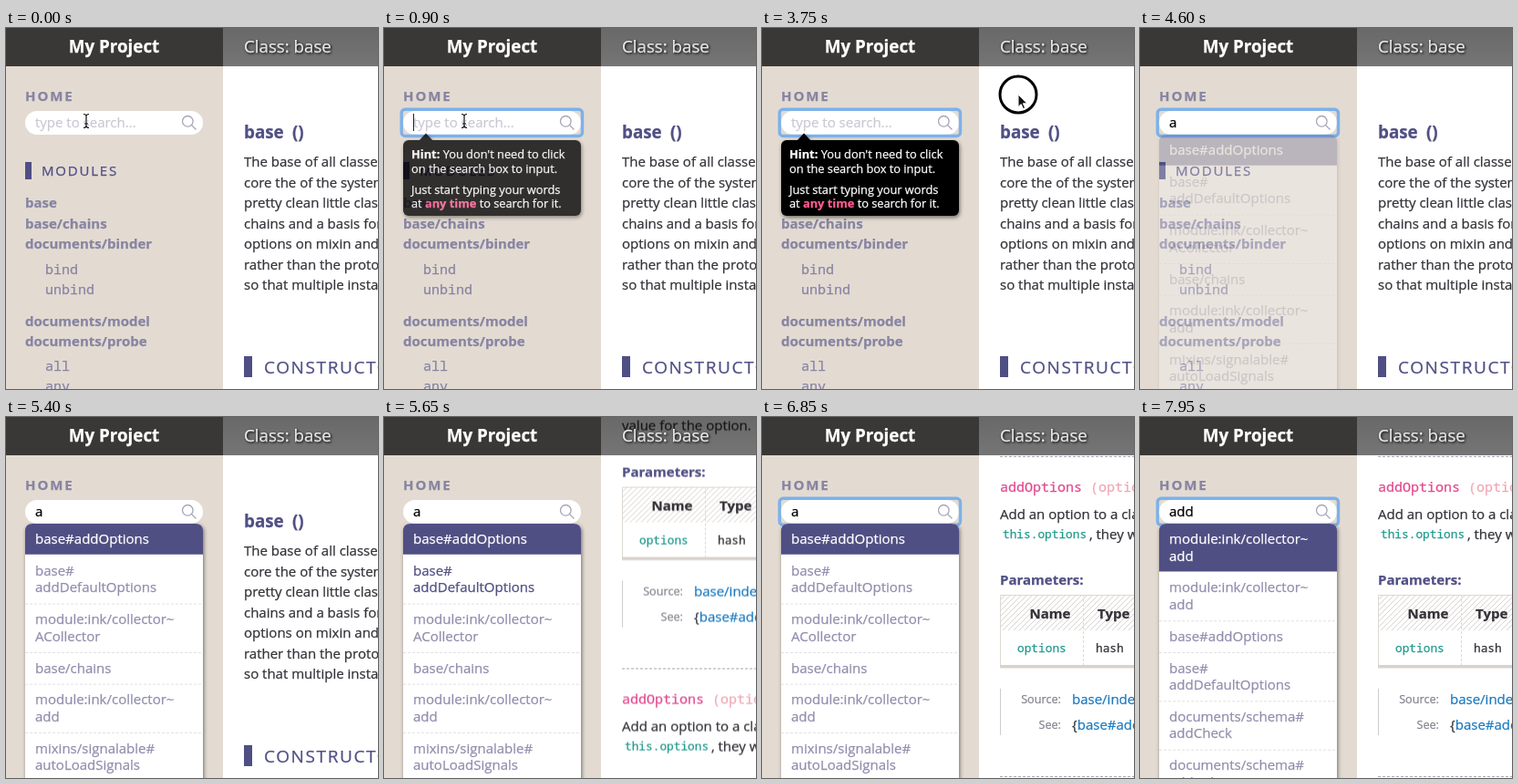
Recreate the animation shown at these times as an HTML page. Size 408x396 px, loop 8 s.

```html
<!DOCTYPE html>
<html lang="en">
<head>
<meta charset="utf-8">
<title>My Project</title>
<style>
html, body { margin: 0; width: 100%; height: 100%; overflow: hidden; background: #fff; }
svg { display: block; width: 408px; height: 396px; font: 15px "Open Sans", sans-serif; }
/* the hairline stroke gives the text a slightly fuller weight */
text { white-space: pre; fill: currentColor; stroke: currentColor; stroke-width: .25; }
tspan { fill: currentColor; }
rect.ink, path.ink { fill: currentColor; }
.b { font-weight: 700; }
.m { font-family: "Noto Sans Mono", monospace; }
.ink { color: #504f84; }
.nav { color: #8784a2; }
.body { color: #333238; }
.teal { color: #1f9a8c; font-size: 12.8px; }
.link { color: #1b7ac0; }
.note { color: #86848f; font-size: 12.7px; }
.pink { color: #e2498f; }
.pale { color: #f0a9b4; }
.hot { color: #ff5b94; }
.hush { color: #cac8d4; }
.on { color: #fff; }
.row { color: #908eae; }
.dash { stroke: #a9a5b3; stroke-dasharray: 3 2; }

/* one 8 s clock; 1% = 80 ms */
.anim { animation: 8s step-end infinite; }
.fade { animation-timing-function: linear; }
#page { animation-name: scroll; }
#ring { animation-name: ring; }
#hint { animation-name: hint; }
#caret { animation-name: caret; }
#blank { animation-name: blank; }
#a { animation-name: a; }
#ad { animation-name: ad; }
#add { animation-name: add; }
#first { animation-name: first; }
#second { animation-name: second; }
#first .warm { animation: warm 8s step-end infinite; }
#mouse { animation-name: move; }
#pointer { animation-name: pointer; }
#beam { animation-name: beam; }
#arrow { animation-name: arrow; }
#click { animation-name: click; }
.list, #hint { filter: drop-shadow(1px 2px 2px rgba(0,0,0,.5)); }

@keyframes scroll {
  0%, 67.8% { transform: translateY(0); animation-timing-function: cubic-bezier(.25,.84,.44,1); }
  75.25%, 100% { transform: translateY(-1238px); }
}
@keyframes ring {
  0%, 47.4%, 66.8% { opacity: 0; }
  6.8%, 56.2%, 81.2%, 100% { opacity: 1; }
}
@keyframes hint {
  0%, 6.8% { opacity: 0; }
  12.5%, 47.1% { opacity: 1; }
  49.4%, 100% { opacity: 0; }
}
@keyframes caret {
  0%, 14.3%, 28.1%, 43.1%, 100% { opacity: 0; }
  7.4%, 21.2%, 35% { opacity: 1; }
}
@keyframes blank { 0% { opacity: 1; } 56.2%, 100% { opacity: 0; } }
@keyframes a { 0%, 88.7%, 100% { opacity: 0; } 56.2% { opacity: 1; } }
@keyframes ad { 0%, 93.1%, 100% { opacity: 0; } 88.7% { opacity: 1; } }
@keyframes add { 0% { opacity: 0; } 93.1%, 100% { opacity: 1; } }
@keyframes first {
  0%, 56.8% { opacity: 0; }
  59.4%, 71.8% { opacity: 1; }
  74.4%, 81.2% { opacity: 0; }
  83.1%, 88.7% { opacity: 1; }
  88.71%, 100% { opacity: 0; }
}
@keyframes second { 0% { opacity: 0; } 88.7%, 100% { opacity: 1; } }
@keyframes warm { 0%, 75%, 100% { color: #908eae; } 68.7% { color: #504f84; } }
@keyframes move {
  0%, 33% { transform: translate(88px,102px); animation-timing-function: ease-in-out; }
  40%, 100% { transform: translate(281px,73px); }
}
@keyframes pointer { 0% { opacity: 1; } 56.2%, 100% { opacity: 0; } }
@keyframes beam { 0% { opacity: 1; } 36%, 100% { opacity: 0; } }
@keyframes arrow { 0% { opacity: 0; } 36%, 100% { opacity: 1; } }
@keyframes click { 0%, 48.6%, 100% { opacity: 0; } 46.8% { opacity: 1; } }
</style>
</head>
<body>
<svg viewBox="0 0 408 396" xmlns="http://www.w3.org/2000/svg">
  <defs>
    <pattern id="hatch" width="6" height="6" patternUnits="userSpaceOnUse">
      <path d="M-1 1L1-1M0 6L6 0M5 7L7 5" stroke="#d9d3ce"/>
    </pattern>
    <linearGradient id="bar" x2="0" y2="1">
      <stop offset="0" stop-color="#000" stop-opacity=".59"/>
      <stop offset="1" stop-color="#000" stop-opacity=".54"/>
    </linearGradient>
    <path id="ibeam" d="M-3-7.500Q0-7.500 0-5V5Q0 7.500-3 7.500M3-7.500Q0-7.500 0-5M0 5Q0 7.500 3 7.500M-2 3H2"/>
    <g id="spec">
      <text class="b ink" x="261" y="184">Parameters:</text>
      <rect x="261" y="195" width="160" height="39" fill="url(#hatch)"/>
      <path d="M261.500 272V195.500H420" fill="none" stroke="#dcd7d2"/>
      <path d="M352.500 195V272" stroke="#ddd8d4" stroke-dasharray="3 2"/>
      <rect x="261" y="272" width="160" height="3.500" fill="#d8d2cb"/>
      <g class="b body"><text x="293.500" y="221">Name</text><text x="368" y="221">Type</text></g>
      <text class="m teal" x="280" y="258">options</text>
      <text class="m body" x="366" y="258" font-size="12.8">hash</text>
      <path d="M261.500 298V349" stroke="#cfcbc8"/>
      <g class="note" text-anchor="end"><text x="328" y="314">Source:</text><text x="328" y="342">See:</text></g>
      <text class="link" x="340" y="315">base/index.js</text>
      <text class="body" x="340" y="343">{<tspan class="link">base#addOptions</tspan>}</text>
    </g>
  </defs>

  <g id="page" class="anim">
    <g class="b ink" font-size="18.800"><text x="261" y="121">base</text><text x="314" y="121">()</text></g>
    <g id="about" class="body"></g>
    <rect class="ink" x="261" y="360" width="9" height="23"/>
    <text class="ink" x="283" y="379" font-size="19" letter-spacing="1.6">CONSTRUCTOR</text>
    <text class="m pink" x="261" y="430">new base <tspan class="pale">(options)</tspan></text>
    <use href="#spec" y="300"/>
    <rect class="ink" x="261" y="850" width="9" height="23"/>
    <text class="ink" x="283" y="869" font-size="19" letter-spacing="1.6">METHODS</text>
    <g transform="translate(0 887)">
      <path class="dash" d="M261 43.500H408"/>
      <text class="m pink" x="261" y="82">addDefaultOptions</text>
      <text class="body" x="261" y="112">Add an option and a default</text>
      <text class="body" x="261" y="133">value for the option.</text>
      <use href="#spec"/>
    </g>
    <g transform="translate(0 1238)">
      <path class="dash" d="M261 43.500H408M261 394.500H408"/>
      <text class="m pink" x="261" y="82">addOptions <tspan class="pale">(options)</tspan></text>
      <text class="body" x="261" y="112">Add an option to a class</text>
      <text class="m teal" x="264" y="133">this.options</text>
      <text class="body" x="359" y="134">, they will</text>
      <use href="#spec"/>
    </g>
  </g>

  <rect x="238" width="170" height="42" fill="url(#bar)"/>
  <text class="on" x="261" y="27" font-size="18.700" style="text-shadow:1px 1px 3px #000">Class: base</text>

  <rect width="238" height="396" fill="#e3dbd2"/>
  <rect width="238" height="42" fill="#3a3836"/>
  <text class="b on" x="118.500" y="27" font-size="18.800" text-anchor="middle">My Project</text>
  <text class="b nav" x="21" y="80" letter-spacing="1.9">HOME</text>
  <rect class="ink" x="21" y="147" width="7" height="19"/>
  <text class="ink" x="39" y="162" letter-spacing="1.8">MODULES</text>
  <g class="b nav">
    <text x="21" y="197">base</text>
    <text x="21" y="220">base/chains</text>
    <text x="21" y="242">documents/binder</text>
    <text x="21" y="327">documents/model</text>
    <text x="21" y="349">documents/probe</text>
  </g>
  <g class="m nav">
    <text x="43" y="270">bind</text>
    <text x="43" y="292">unbind</text>
    <text x="43" y="376">all</text>
    <text x="43" y="398">any</text>
  </g>

  <rect x="21" y="91" width="195" height="26" rx="13" fill="#fff"/>
  <rect id="ring" class="anim" x="19.200" y="89.200" width="198.300" height="29.300" rx="4" fill="none" stroke="#7db1ea" stroke-width="3.400"/>
  <text id="blank" class="anim hush" x="32" y="109">type to search...</text>
  <text id="a" class="anim" x="32" y="109">a</text>
  <text id="ad" class="anim" x="32" y="109">ad</text>
  <text id="add" class="anim" x="32" y="109">add</text>
  <path id="caret" class="anim" d="M32.500 94V113" stroke="#222"/>
  <g fill="none" stroke="#a8a5b8" stroke-width="1.300"><circle cx="199.300" cy="102.300" r="5.800"/><path d="M203.500 106.500L208.500 111.500"/></g>

  <g id="hint" class="anim fade on" font-size="12.800">
    <path d="M38 124L46 115.500L54 124Z" fill="#000"/>
    <rect x="21" y="123" width="195" height="83" rx="6" fill="#000"/>
    <text x="30" y="143"><tspan class="b">Hint:</tspan> You don't need to click</text>
    <text x="30" y="158.500">on the search box to input.</text>
    <text x="30" y="181.500">Just start typing your words</text>
    <text x="30" y="196.500">at <tspan class="b hot">any time</tspan> to search for it.</text>
  </g>

  <g id="first" class="anim fade list"></g>
  <g id="second" class="anim list"></g>

  <g id="pointer" class="anim">
    <circle id="click" class="anim" cx="281" cy="73" r="20" fill="none" stroke="#000" stroke-width="3"/>
    <g id="mouse" class="anim">
      <g id="beam" class="anim" fill="none">
        <use href="#ibeam" stroke="#fff" stroke-width="2.600" stroke-opacity=".7"/>
        <use href="#ibeam" stroke="#111" stroke-width="1.200"/>
      </g>
      <path id="arrow" class="anim" d="M0 0V13.500L3.200 10.600L5.400 15.600L7.600 14.600L5.400 9.800H9.800Z" fill="#111" stroke="#fff"/>
    </g>
  </g>
</svg>
<script>
const $ = id => document.getElementById(id);

$("about").innerHTML = [
  "The base of all classes", "core the of the system", "pretty clean little class",
  "chains and a basis for", "options on mixin and", "rather than the prototype",
  "so that multiple instances"
].map((line, i) => `<text x="261" y="${152 + i * 22.5}">${line}</text>`).join("");

// "|" marks a line break; the first row is the selected one
function fill(id, rows) {
  let y = 117;
  let out = `<path d="M21 400V125Q21 117 29 117H208Q216 117 216 125V400Z" fill="#fff"/>`;
  rows.forEach((row, i) => {
    const lines = row.split("|");
    const h = 16 + lines.length * 18.7;
    const end = y + h;
    if (i === 0) out += `<path class="ink" d="M21 ${end - 1}V125Q21 117 29 117H208Q216 117 216 125V${end - 1}Z"/>`;
    else out += `<path d="M21 ${end}H216" stroke="#e2e0e4" stroke-dasharray="3 2"/>`;
    const look = ["on", "row warm"][i] || "row";
    lines.forEach((line, n) => {
      out += `<text class="${look}" x="32" y="${y + 22 + n * 18.5}">${line}</text>`;
    });
    y = end;
  });
  $(id).innerHTML = out;
}

fill("first", [
  "base#addOptions", "base#|addDefaultOptions", "module:ink/collector~|ACollector",
  "base/chains", "module:ink/collector~|add", "mixins/signalable#|autoLoadSignals"
]);
fill("second", [
  "module:ink/collector~|add", "module:ink/collector~|add", "base#addOptions",
  "base#|addDefaultOptions", "documents/schema#|addCheck", "documents/schema#|addIndex"
]);
</script>
</body>
</html>
```
